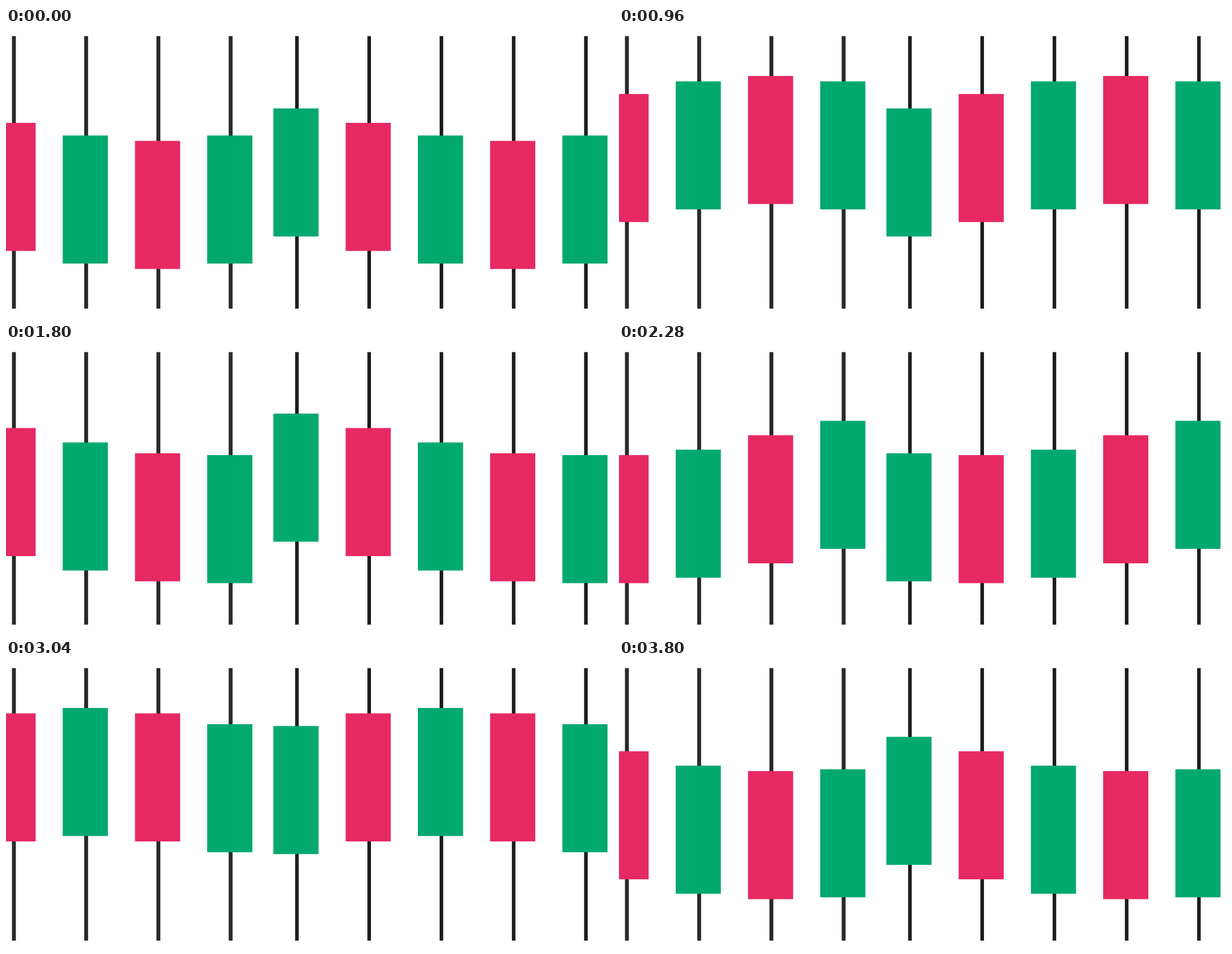
Write an HTML page with a canvas that moves like this. It is 1086 px wide and 516 px high and loops after 3.84 s.

```html
<!DOCTYPE html>
<html lang="en">
<head>
<meta charset="utf-8">
<title>Candlestick wave</title>
<style>
  html, body { margin: 0; width: 100%; height: 100%; overflow: hidden; background: #fff; }
  canvas { display: block; }
</style>
</head>
<body>
<canvas id="stage" width="1086" height="516"></canvas>
<script>
const ctx = document.getElementById('stage').getContext('2d');
const GREEN = '#02a96e', PINK = '#e72963';
const UNIT = 3.2315;            // one motion step in stage pixels
const PITCH = 40 * UNIT;
const BODY_W = 25 * UNIT, BODY_H = 71 * UNIT;
const REST_Y = 144.1;
const SWING = 18;               // steps above and below rest
const FRAME_MS = 40, FRAMES_PER_WAVE = 48;

// Two groups share one wave; the first group lacks the leading candle.
const candles = [];
for (let i = 1; i < 5; i++) {
  candles.push({ x: 101.5 + (i - 2) * PITCH, index: i, wickX: 10.8, wickW: 7, wick: '#2a2a2a' });
}
for (let i = 0; i < 5; i++) {
  candles.push({ x: 478.4 + i * PITCH, index: i, wickX: 0, wickW: 6.4, wick: '#1c1c1c' });
}
candles.forEach(c => {
  c.wickX = c.x + (c.wickW === 7 ? 38.4 : 38.9);
  c.color = c.index % 2 ? PINK : GREEN;
});

function bodyTop(frame, index) {
  // The tiny lag settles exact half-swing values before truncation.
  const phase = 2 * Math.PI * (frame / FRAMES_PER_WAVE + index / 12) - 1e-9;
  return REST_Y + UNIT * Math.trunc(SWING * Math.sin(phase));
}

function draw(now) {
  const frame = Math.floor(now / FRAME_MS) % (2 * FRAMES_PER_WAVE);
  ctx.fillStyle = '#fff';
  ctx.fillRect(0, 0, 1086, 516);
  for (const c of candles) {
    ctx.fillStyle = c.wick;
    ctx.fillRect(c.wickX, 14.5, c.wickW, 488.3);
    ctx.fillStyle = c.color;
    ctx.fillRect(c.x, bodyTop(frame, c.index), BODY_W, BODY_H);
  }
}

let start;
function tick(now) {
  start ??= now;
  draw(now - start);
  requestAnimationFrame(tick);
}
draw(0);
requestAnimationFrame(tick);
</script>
</body>
</html>
```
